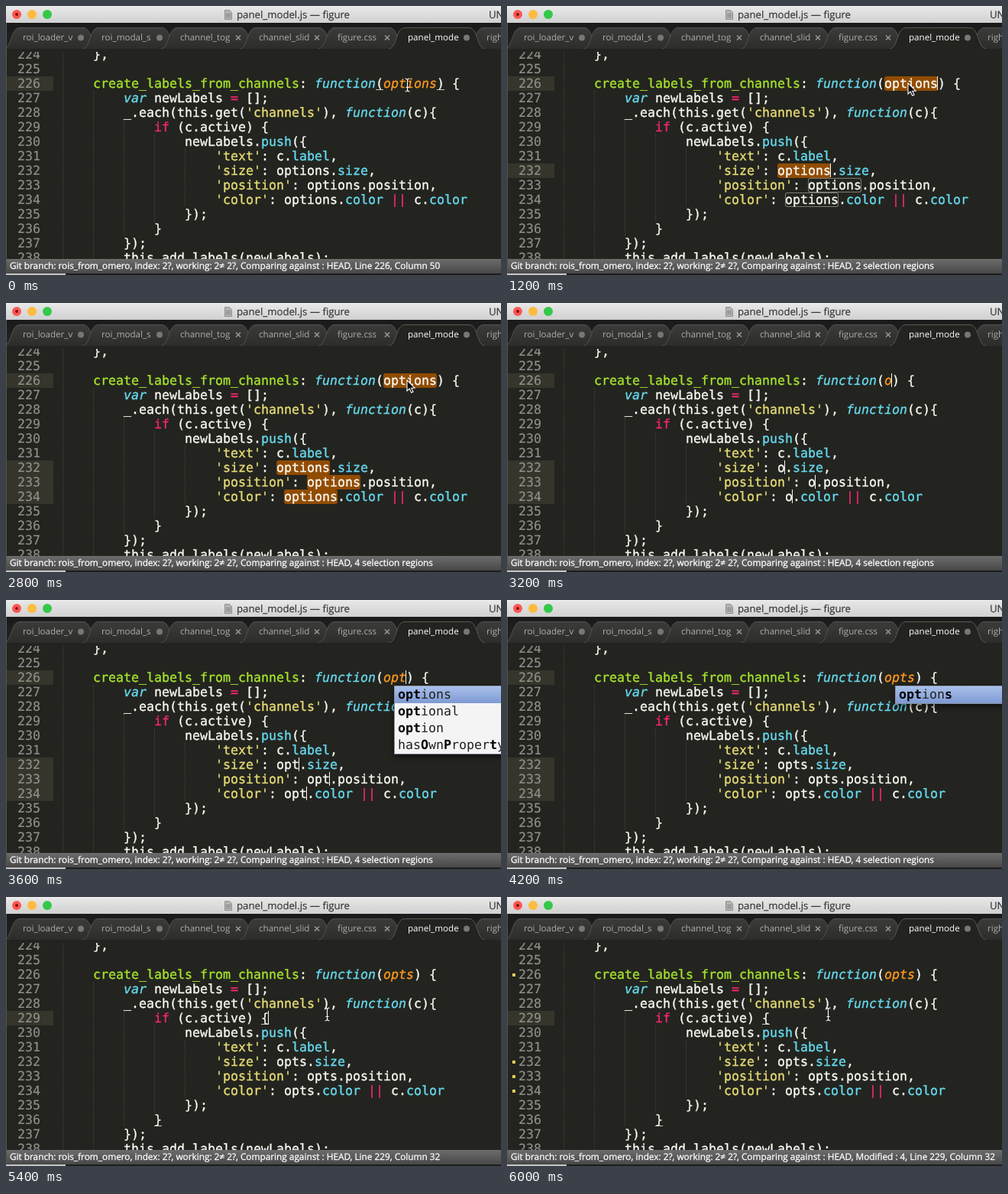
An HTML page that plays this animation: 648 by 352 pixels, repeating every 6200 ms.

```html
<!DOCTYPE html>
<html lang="en">
<head>
<meta charset="utf-8">
<title>Multiple selection in a code editor</title>
<style>
html, body { margin: 0; width: 100%; height: 100%; overflow: hidden; background: #23241f; }
#stage { position: relative; width: 648px; height: 352px; overflow: hidden; background: #23241f;
  font-family: "Open Sans", "Noto Sans", sans-serif; text-rendering: geometricPrecision; }
#stage > * { position: absolute; }
#title { left: 0; top: 0; width: 648px; height: 22px; font-size: 13.2px; line-height: 22px; color: #383838;
  background: linear-gradient(#f2f2f2, #e6e6e6 2px, #d1d1d1); white-space: nowrap; -webkit-text-stroke: .2px; }
#title span { position: absolute; top: 0; }
#title i { position: absolute; top: 5px; width: 12px; height: 12px; border-radius: 50%; }
#title .edited::after { content: ""; position: absolute; left: 4px; top: 4px; width: 4px; height: 4px;
  border-radius: 50%; background: #7d1512; }
#tabs { left: 0; top: 22px; }
#tabs text { font: 11.6px "Open Sans", "Noto Sans", sans-serif; fill: #aeaeae; }
#tabs .on { fill: #fff; }
#editor { left: 0; top: 60px; width: 648px; height: 271px; overflow: hidden; color: #f8f8f2; -webkit-text-stroke: .35px; }
#editor, #popup { font: 16.61px/19px "DejaVu Sans Mono", "Noto Sans Mono", monospace; }
.row { position: absolute; left: 0; width: 648px; height: 19px; white-space: pre; }
.num { position: absolute; left: 0; width: 47px; height: 19px; padding-left: 15px; color: #8f908a; -webkit-text-stroke: .15px; }
.num.on { background: #36352b; }
.num.mod::before { content: ""; position: absolute; left: 7px; top: 8px; width: 4px; height: 4px; background: #d9cb5c; }
.code { position: absolute; left: 74px; top: 0; }
.guide { position: absolute; width: 0; border-left: 1px dotted #43443d; }
.fn { color: #a6e22e; }
.kw, .arg { font-style: italic; }
.kw, .sup { color: #66d9ef; }
.arg { color: #fd971f; }
.op { color: #f92672; }
.str { color: #e6db74; }
.pair { box-shadow: inset 0 -1px #c8c8c0; display: inline-block; height: 18px; vertical-align: top; }
.word { position: relative; display: inline-block; height: 19px; vertical-align: top; }
.sel { background: #924c00; border-radius: 3px; color: #f8f8f2; font-style: normal; }
.match { box-shadow: inset 0 0 0 1px #7c7c74; border-radius: 3px; }
.caret { position: absolute; width: 1px; height: 18px; margin: 0 0 0 -1px; background: #f8f8f0; }
#popup { left: 508px; top: 112px; width: 160px; color: #222; background: #f4f4f4; border: 1px solid #8b93a3;
  box-shadow: 0 3px 8px #0009; white-space: pre; }
#popup div { height: 22px; line-height: 22px; padding-left: 4px; }
#popup div:first-child { background: linear-gradient(#a9c0ea, #7d9ad3); }
#popup b { color: #000; }
#status { left: 0; top: 331px; width: 643px; height: 19px; padding-left: 5px; font-size: 11.8px; line-height: 18px;
  color: #fff; white-space: pre; background: linear-gradient(#6c6c6c, #484848); -webkit-text-stroke: .3px; }
#base { left: 0; top: 350px; width: 648px; height: 2px; background: linear-gradient(90deg, #c4c4c4 78px, #1d1d1d 78px); }
#edge { left: 0; top: 22px; width: 1px; height: 328px; background: #55564f; }
#mouse { left: 0; top: 0; }
</style>
</head>
<body>
<div id="stage">
  <div id="title">
    <i class="edited" style="left:8px;background:#fc5753"></i><i style="left:28px;background:#fdbc40"></i><i style="left:48px;background:#34c84a"></i>
    <svg width="12" height="14" style="position:absolute;left:285px;top:5px"><path d="M1.5 .5H7.5l3 3V12.5h-9z" fill="#b4b4b4" stroke="#909090"/><path d="M3 5.5h6m-6 2h6m-6 2h6" stroke="#858585"/></svg>
    <span style="left:302px">panel_model.js — figure</span><span style="left:632px">UNREGISTERED</span>
  </div>
  <svg id="tabs" width="648" height="38"></svg>
  <div id="editor"></div>
  <div id="popup"></div>
  <div id="status"></div>
  <div id="base"></div>
  <div id="edge"></div>
  <svg id="mouse" width="648" height="352">
    <path id="arrow" d="M0 0V14L3.3 11L5.6 16.2L8 15.2L5.7 10.2H10Z" fill="#000" stroke="#fff" stroke-width="1.1"/>
    <path id="beam" d="M-3 -8.5Q0 -8.5 0 -6Q0 -8.5 3 -8.5M0 -6.5V6.5M-3 8.5Q0 8.5 0 6Q0 8.5 3 8.5M-2 3H2" fill="none" stroke="#fff" stroke-width="1.1"/>
  </svg>
</div>
<script>
const $ = id => document.getElementById(id);
const tok = (cls, text) => `<span class="${cls}">${text}</span>`;
const LOOP = 6200, STEP = 200, FIRST = 224, ROW = 19;

function drawTabs() {
  const tabs = [
    [5, 112, 'roi_loader_v', 98, 1], [108, 215, 'roi_modal_s', 201, 1],
    [211, 318, 'channel_tog', 304, 0], [314, 421, 'channel_slid', 407, 0],
    [417, 513, 'figure.css', 499, 0], [612, 720, 'right_panel', 706, 0],
    [509, 617, 'panel_mode', 603, 1]
  ];
  let out = `<defs>
    <linearGradient id="bar" x2="0" y2="1"><stop stop-color="#1a1a1a"/><stop offset="1" stop-color="#242424"/></linearGradient>
    <linearGradient id="tab" x2="0" y2="1"><stop stop-color="#3b3b39"/><stop offset="1" stop-color="#2d2d2b"/></linearGradient>
    </defs><rect width="648" height="38" fill="url(#bar)"/>`;
  for (const [a, b, name, x, dirty] of tabs) {
    const on = name === 'panel_mode';
    out += `<path d="M${a - 8} 34C${a + 3} 33 ${a + 1} 6.5 ${a + 13} 6.5H${b - 11}C${b + 1} 6.5 ${b - 1} 33 ${b + 10} 34"
      fill="${on ? '#23241f' : 'url(#tab)'}" stroke="${on ? '#595a54' : '#525250'}"/>
      <text x="${a + 17}" y="23" class="${on ? 'on' : ''}">${name}</text>`;
    out += dirty ? `<circle cx="${x}" cy="19.5" r="4" fill="#777"/>`
      : `<path d="M${x - 3} 16.5l6 6m0 -6l-6 6" stroke="#969696" stroke-width="1.6"/>`;
  }
  $('tabs').innerHTML = out + '<rect y="34" width="648" height="4" fill="#23241f"/>';
}

// Everything visible is derived from the step's start time.
function stateAt(t) {
  const regions = t < 400 ? 0 : t < 1000 ? 1 : t < 1400 ? 2 : t < 1600 ? 3 : 4;
  const typing = t >= 3200, done = t >= 5400;
  const text = !typing ? 'options' : 'opts'.slice(0, (t - 3200) / STEP + 1);
  const blinkOff = t === 800 || (t >= 2200 && t < 3000) || t === 4200 || t === 4400 ||
    (t >= 4800 && t < 5400) || t >= 5800 || t === 0;
  const popup = t >= 3600 && !done ? (t < 3800 ? 'list' : 'one') : '';
  const place = done ? 'Line 229, Column 32' : regions === 0 ? 'Line 226, Column 50'
    : regions === 1 ? '7 characters selected' : regions + ' selection regions';
  return { t, regions, typing, done, text, caret: !blinkOff, popup, saved: t >= 5800, place };
}

function word(s, i) {
  const picked = i < s.regions && !s.done;
  const cls = ['word', i === 0 ? 'arg' : ''];
  if (!s.typing && s.regions) cls.push(picked ? 'sel' : 'match');
  const caret = picked && s.caret ? '<i class="caret" style="left:100%"></i>' : '';
  const inside = i === 0 && !s.regions && s.caret ? '<i class="caret" style="left:30px"></i>' : '';
  return tok(cls.join(' '), s.text + caret + inside);
}

function codeLines(s) {
  const w = i => word(s, i);
  const paren = c => s.regions === 0 ? tok('pair', c) : c;
  const brace = c => s.done ? tok('pair', c) : c;
  const endCaret = s.done && s.caret ? '<i class="caret"></i>' : '';
  const fun = tok('kw', 'function');
  const key = k => tok('str', `'${k}'`) + ': ';
  const sup = k => '.' + tok('sup', k);
  return [
    [1, '},'],
    [0, ''],
    [1, tok('fn', 'create_labels_from_channels') + ': ' + fun + paren('(') + w(0) + paren(')') + ' {'],
    [2, tok('kw', 'var') + ' newLabels ' + tok('op', '=') + ' [];'],
    [2, '_.each(this.get(' + tok('str', "'channels'") + '), ' + fun + '(c){'],
    [3, tok('op', 'if') + ' (c.active) ' + brace('{') + endCaret],
    [4, 'newLabels' + sup('push') + '({'],
    [5, key('text') + 'c' + sup('label') + ','],
    [5, key('size') + w(1) + sup('size') + ','],
    [5, key('position') + w(2) + '.position,'],
    [5, key('color') + w(3) + sup('color') + ' ' + tok('op', '||') + ' c' + sup('color')],
    [4, '});'],
    [3, brace('}')],
    [2, '});'],
    [2, 'this.add_labels(newLabels);']
  ];
}

function drawEditor(s) {
  const spots = [226, 232, 233, 234];
  const active = s.done ? [229] : spots.slice(0, Math.max(1, s.regions));
  const top = n => (n - FIRST) * ROW - 6;
  const guides = [[0, 224, 239], [1, 227, 239], [2, 229, 237], [3, 230, 236], [4, 231, 235]];
  const lines = guides.map(([col, a, b]) =>
    `<i class="guide" style="left:${74 + col * 40}px;top:${top(a)}px;height:${(b - a) * ROW}px"></i>`);
  codeLines(s).forEach(([indent, html], i) => {
    const n = FIRST + i;
    const cls = 'num' + (active.includes(n) ? ' on' : '') + (s.saved && spots.includes(n) ? ' mod' : '');
    lines.push(`<div class="row" style="top:${top(n)}px"><span class="${cls}">${n}</span>` +
      `<span class="code">${'    '.repeat(indent)}${html}</span></div>`);
  });
  $('editor').innerHTML = lines.join('');
}

function drawPopup(kind) {
  const items = kind === 'list'
    ? ['<b>opt</b>ions', '<b>opt</b>ional', '<b>opt</b>ion', 'has<b>O</b>wn<b>P</b>roper<b>t</b>y']
    : ['<b>opt</b>ion<b>s</b>'];
  $('popup').style.display = kind ? '' : 'none';
  $('popup').innerHTML = items.map(x => `<div>${x}</div>`).join('');
}

function drawMouse(t) {
  const stops = [[0, 'beam', 525.5, 103.5], [400, 'arrow', 525, 101], [3200, ''], [4800, 'arrow', 522, 101],
    [5000, 'beam', 500, 118], [5200, 'beam', 452, 141], [5400, 'beam', 420.5, 153.5]];
  const [, shape, x, y] = stops.filter(p => p[0] <= t).pop();
  for (const id of ['arrow', 'beam']) {
    $(id).style.display = id === shape ? '' : 'none';
    if (id === shape) $(id).setAttribute('transform', `translate(${x} ${y})`);
  }
}

let last = -1;
function tick() {
  const t = Math.floor(performance.now() % LOOP / STEP) * STEP;
  if (t !== last) {
    last = t;
    const s = stateAt(t);
    drawEditor(s);
    drawPopup(s.popup);
    drawMouse(t);
    $('status').textContent = 'Git branch: rois_from_omero, index: 2?, working: 2≠ 2?, Comparing against : HEAD, ' +
      (s.saved ? 'Modified : 4, ' : '') + s.place;
  }
  requestAnimationFrame(tick);
}
drawTabs();
tick();
</script>
</body>
</html>
```
